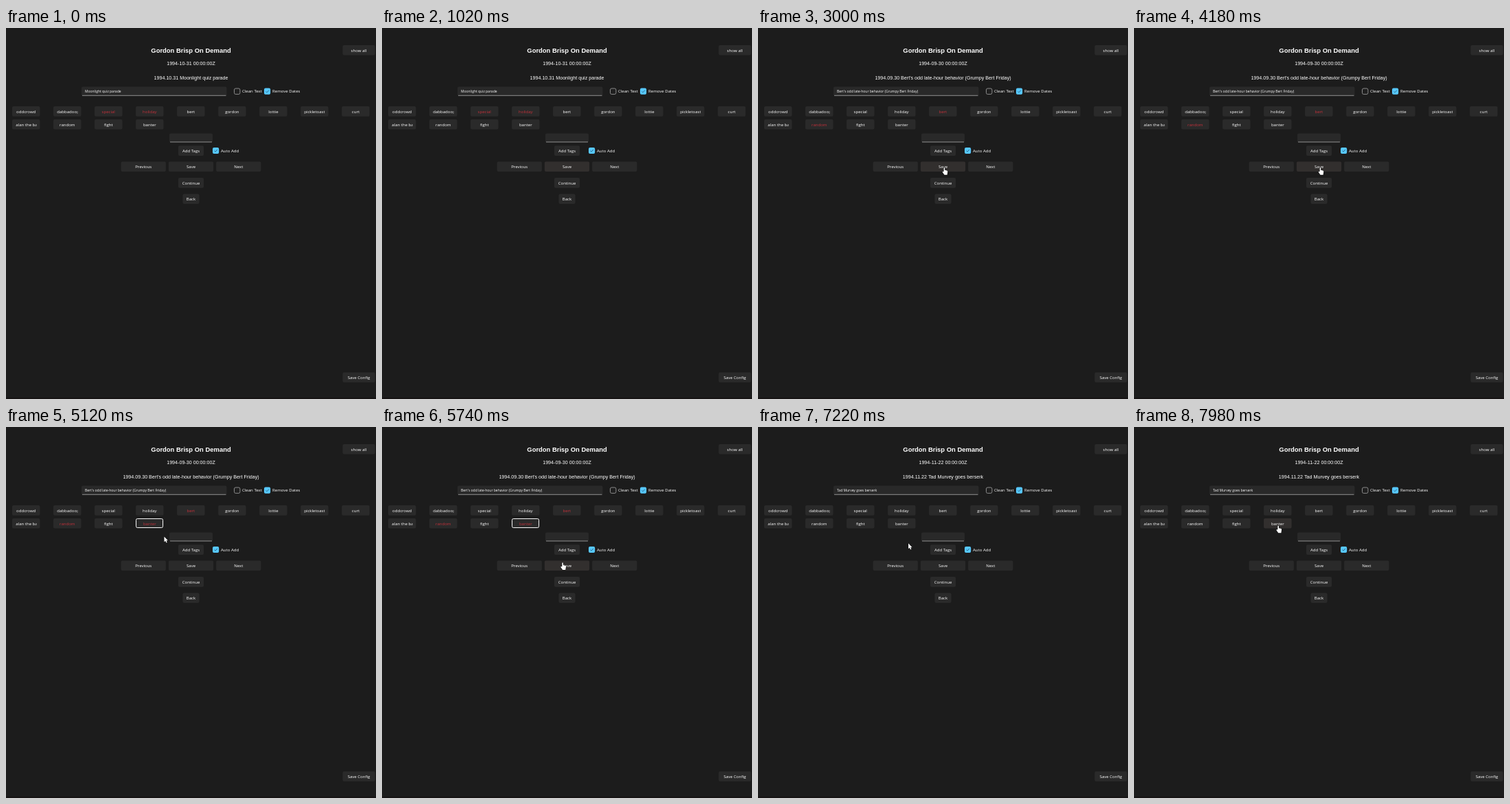
An HTML page with a canvas that plays this animation: 539 by 540 pixels, repeating every 8000 ms.

```html
<!DOCTYPE html>
<html lang="en">
<head>
<meta charset="utf-8">
<title>Tag editor</title>
<style>
  html, body { margin: 0; width: 100%; height: 100%; overflow: hidden; background: #1c1c1c; }
  canvas { display: block; }
</style>
</head>
<body>
<canvas id="stage" width="539" height="540"></canvas>
<script>
const ctx = document.getElementById('stage').getContext('2d');
const LOOP = 8000;
const UI = '500 6.05px "Open Sans", "Noto Sans", sans-serif';
const UI_SMALL = '500 5px "Open Sans", "Noto Sans", sans-serif';
const ARIAL = '7.15px "Liberation Sans", Arial, sans-serif';
const ARIAL_BOLD = 'bold 9.45px "Liberation Sans", Arial, sans-serif';
const COLORS = { page: '#1c1c1c', button: '#2a2a2a', hover: '#322f2e', text: '#fff', tagged: '#c4303a', accent: '#57c8ff' };

const TAGS = ['oddcrowd', 'dabbadoop', 'special', 'holiday', 'bert', 'gordon', 'lottie',
  'pickletoast', 'curt', 'alan the bak', 'random', 'fight', 'banter'];

const EPISODES = [
  { from: 0, date: '1994-10-31', name: 'Moonlight quiz parade', tags: ['special', 'holiday'] },
  { from: 1180, date: '1994-09-30', name: "Bert's odd late-hour behavior (Grumpy Bert Friday)", tags: ['bert', 'random'] },
  { from: 5760, date: '1994-11-22', name: 'Tad Murvey goes berserk', tags: [] }
];
const BANTER_CLICK = 4880;
const HOVER_START = 1020;
const CURSOR_START = 1180;

// Pointer tip: time, x, y
const POINTER = [
  [1020, 272, 202], [1580, 272, 202], [1940, 272, 201], [2460, 272.5, 202],
  [2620, 273.5, 202.5], [2800, 273, 202], [2900, 270, 202], [3000, 271.3, 202.8],
  [4230, 271.3, 202.8], [4500, 259, 194], [4780, 214, 143], [4920, 213, 142],
  [5120, 230.4, 159.4], [5240, 234, 165], [5520, 263, 197], [6380, 263, 197],
  [6620, 252, 195.5], [6940, 227, 184], [7400, 214, 160], [7760, 211, 147.5], [8000, 210, 142.8]
];

function pointerAt(t) {
  const next = POINTER.findIndex(key => key[0] > t);
  if (next < 1) return { x: POINTER[0][1], y: POINTER[0][2] };
  const [t0, x0, y0] = POINTER[next - 1];
  const [t1, x1, y1] = POINTER[next];
  const k = (t - t0) / (t1 - t0);
  return { x: x0 + (x1 - x0) * k, y: y0 + (y1 - y0) * k };
}

function text(str, x, y, font = UI, align = 'left', color = COLORS.text) {
  ctx.font = font;
  ctx.textAlign = align;
  ctx.fillStyle = color;
  ctx.fillText(str, x, y);
}

function box(x, y, w, h, fill, stroke, radius = 2) {
  ctx.beginPath();
  ctx.roundRect(x, y, w, h, radius);
  if (fill) { ctx.fillStyle = fill; ctx.fill(); }
  if (stroke) { ctx.strokeStyle = stroke; ctx.lineWidth = 1; ctx.stroke(); }
}

// Returns true when the pointer is over the button.
function button(label, cx, cy, w, pointer, color) {
  const h = 14.6, x = cx - w / 2, y = cy - h / 2;
  const over = !!pointer && Math.abs(pointer.x - cx) < w / 2 && Math.abs(pointer.y - cy) < h / 2;
  box(x, y, w, h, over ? COLORS.hover : COLORS.button);
  ctx.save();
  ctx.beginPath();
  ctx.rect(x + 5, y, w - 10, h);
  ctx.clip();
  ctx.font = UI;
  const fits = ctx.measureText(label).width <= w - 10;
  text(label, fits ? cx : x + 5.3, cy + 2.2, UI, fits ? 'center' : 'left', color);
  ctx.restore();
  return over;
}

function entry(x, y, w, h, value = '') {
  box(x, y, w, h, '#292929');
  ctx.fillStyle = '#9a9a9a';
  ctx.fillRect(x + 1, y + h - 0.9, w - 2, 0.9);
  text(value, x + 5, y + h / 2 + 1.7, UI_SMALL);
}

function checkbox(label, x, cy, checked) {
  if (checked) {
    box(x, cy - 4.6, 9.2, 9.2, COLORS.accent);
    ctx.beginPath();
    ctx.moveTo(x + 2.5, cy + 0.1);
    ctx.lineTo(x + 4, cy + 1.6);
    ctx.lineTo(x + 6.9, cy - 1.5);
    ctx.strokeStyle = '#1c4254';
    ctx.lineWidth = 0.7;
    ctx.stroke();
  } else {
    box(x + 0.5, cy - 4.2, 8.4, 8.4, '#1f1f1f', '#8c8c8c');
  }
  text(label, x + 12, cy + 2.2);
}

const HAND = new Path2D('M2.3 6.3V1.2Q2.3 .3 3.1 .3T3.9 1.2V4L6.9 4.7Q8.1 5 8 6.4L7.3 11H3.2L.5 7.3Q.1 6.5 .8 6.1Q1.4 5.7 2.3 6.3Z');
const ARROW = new Path2D('M0 0V8L1.8 6.4L3 9.1L4.4 8.5L3.2 5.9H5.6Z');

function drawPointer({ x, y }, isHand) {
  ctx.save();
  ctx.translate(x - (isHand ? 3 : 0), y);
  ctx.strokeStyle = '#000';
  ctx.lineWidth = 0.9;
  ctx.stroke(isHand ? HAND : ARROW);
  ctx.fillStyle = '#fff';
  ctx.fill(isHand ? HAND : ARROW);
  ctx.restore();
}

function draw(t) {
  const episode = EPISODES.filter(e => e.from <= t).pop();
  const pointer = t >= HOVER_START ? pointerAt(t) : null;
  const banterPicked = t >= BANTER_CLICK && t < EPISODES[2].from;
  // Widgets reappear one group after another when the page is rebuilt.
  const ready = delay => episode.from === 0 || t - episode.from >= delay;
  let over = false;
  const add = (...args) => { over = button(...args) || over; };

  ctx.fillStyle = COLORS.page;
  ctx.fillRect(0, 0, 539, 540);
  ctx.fillStyle = '#141111';
  ctx.fillRect(0, 538, 539, 1.5);

  add('show all', 514, 32.3, 47, pointer);
  add('Save Config', 514, 508.5, 47, pointer);

  if (ready(40)) {
    text('Gordon Brisp On Demand', 269.5, 35.9, ARIAL_BOLD, 'center');
    text(episode.date + ' 00:00:00Z', 269.5, 53.9, ARIAL, 'center');
    text(episode.date.replaceAll('-', '.') + ' ' + episode.name, 269.5, 75.4, ARIAL, 'center');
    entry(110, 85.5, 211.5, 13.2, episode.name);
    entry(238, 153.5, 63, 12.9);
    add('Add Tags', 269.5, 178.6, 37, pointer);
    checkbox('Auto Add', 301, 178.5, true);
    add('Previous', 200.2, 201.8, 65.3, pointer);
    add('Save', 269.5, 201.8, 65.3, pointer);
    add('Next', 338.8, 201.8, 65.3, pointer);
    add('Continue', 269.5, 225.4, 37, pointer);
    add('Back', 269.5, 248.8, 24, pointer);
  }

  TAGS.forEach((tag, i) => {
    if (!ready(i < 4 ? 120 : i < 9 ? 80 : 60)) return;
    const cx = 29.2 + (i % 9) * 60.03;
    const cy = 121.4 + Math.floor(i / 9) * 18.9;
    const picked = tag === 'banter' && banterPicked;
    const tagged = picked || episode.tags.includes(tag);
    add(tag, cx, cy, 40.5, pointer, tagged ? COLORS.tagged : COLORS.text);
    if (picked) box(Math.floor(cx - 19.5) + 0.5, Math.floor(cy - 7) + 0.5, 39, 13, null, '#f5f5f5');
  });

  if (ready(140)) {
    checkbox('Clean Text', 332, 92.2, false);
    checkbox('Remove Dates', 376, 92.2, true);
  }

  if (t >= CURSOR_START) drawPointer(pointer, over);
}

const start = performance.now();
function tick() {
  draw((performance.now() - start) % LOOP);
  requestAnimationFrame(tick);
}
tick();
</script>
</body>
</html>
```
